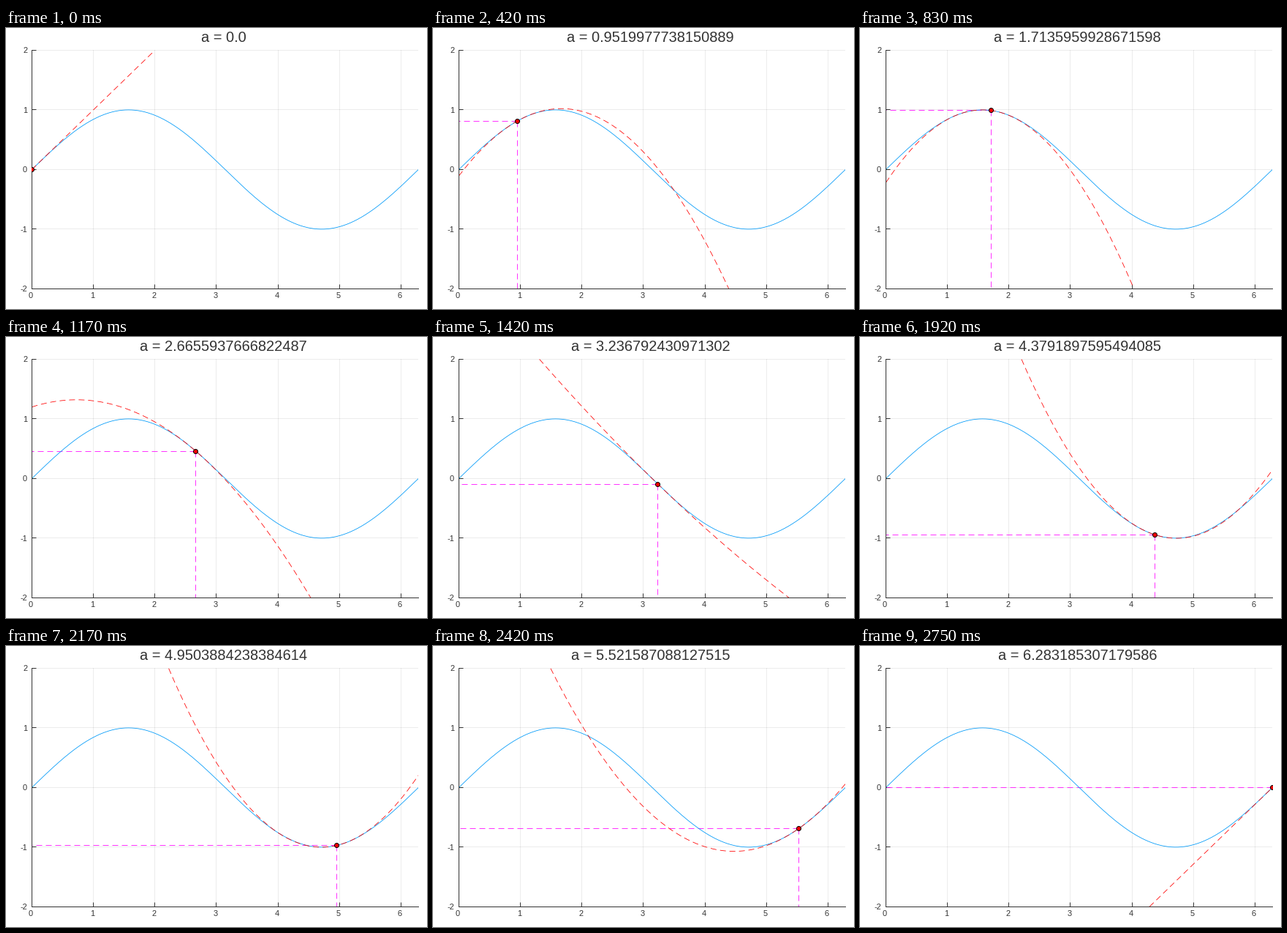
Write a matplotlib script that moves like this. It is 576x384 px and loops after 2830 ms.

```python
import math

import matplotlib.pyplot as plt
import numpy as np
from matplotlib.animation import FuncAnimation
from matplotlib.transforms import ScaledTranslation

plt.rcParams["font.family"] = "Liberation Sans"

W, H, DPI = 576, 384, 96
PX = 72 / DPI  # one pixel in points
STEPS = 33
LOOP_MS = 2830
LEFT, RIGHT, TOP, BOTTOM = 34.9, 563.75, 29.9, 355.9
INK = "#333333"
THIN = 0.8 * PX
DASH = (0, (10, 6.25))  # in line widths: 8 px on, 5 px off

fig = plt.figure(figsize=(W / DPI, H / DPI), dpi=DPI, facecolor="white")
ax = fig.add_axes([LEFT / W, 1 - BOTTOM / H, (RIGHT - LEFT) / W, (BOTTOM - TOP) / H])
ax.set(xlim=(0, 2 * math.pi), ylim=(-2, 2), xticks=range(7), yticks=range(-2, 3))
ax.set_axisbelow(True)
ax.grid(color="black", alpha=0.075, linewidth=PX)
ax.tick_params(direction="in", length=6 * PX, width=PX, color=INK,
               labelbottom=False, labelleft=False)
for side, spine in ax.spines.items():
    spine.set(visible=side in ("left", "bottom"), linewidth=PX, color=INK)


def label(value, xy, dx, dy, ha):
    ax.annotate(str(value), xy, xytext=(dx * PX, dy * PX), textcoords="offset points",
                ha=ha, va="baseline", fontsize=11 * PX, color=INK,
                annotation_clip=False)


for v in range(7):
    label(v, (v, -2), -1.1, -13.5, "center")
for v in range(-2, 3):
    label(v, (0, v), -5.7, -4.3, "right")

title = fig.text(297.7 / W, 1 - 19.3 / H, "", ha="center", va="baseline",
                 fontsize=20 * PX, color=INK)

guide_style = dict(color="magenta", linewidth=THIN, linestyle=DASH, snap=True)
across, = ax.plot([], [], **guide_style)
down, = ax.plot([], [], **guide_style)

# Straight lines snap to pixel centres, so the curves move half a pixel to meet them.
centred = ax.transData + ScaledTranslation(0.5 / DPI, -0.5 / DPI, fig.dpi_scale_trans)
xs = np.linspace(0, 2 * math.pi, 2001)
ax.plot(xs, np.sin(xs), color="#009af9", linewidth=THIN, transform=centred)
taylor, = ax.plot([], [], color="red", linewidth=THIN, linestyle=DASH, transform=centred)
point, = ax.plot([], [], "o", markersize=6 * PX, markerfacecolor="red",
                 markeredgecolor="black", markeredgewidth=PX, zorder=3)


def update(k):
    # Integer ratio keeps every printed digit correctly rounded.
    num, den = (2 * math.pi).as_integer_ratio()
    a = num * k / (den * STEPS)
    s, c = math.sin(a), math.cos(a)
    title.set_text(f"a = {a}")

    across.set_data([a, 0], [s, s])
    down.set_data([a, a], [s, -2])
    point.set_data([a], [s])

    # Dashes start where the parabola enters the plot.
    d = xs - a
    ys = s + c * d - s * d**2 / 2
    taylor.set_data(xs, np.where(abs(ys) <= 2, ys, np.nan))
    return title, across, down, taylor, point


anim = FuncAnimation(fig, update, frames=STEPS + 1, interval=LOOP_MS / (STEPS + 1),
                     repeat=True, repeat_delay=0, blit=False)
plt.show()
```
